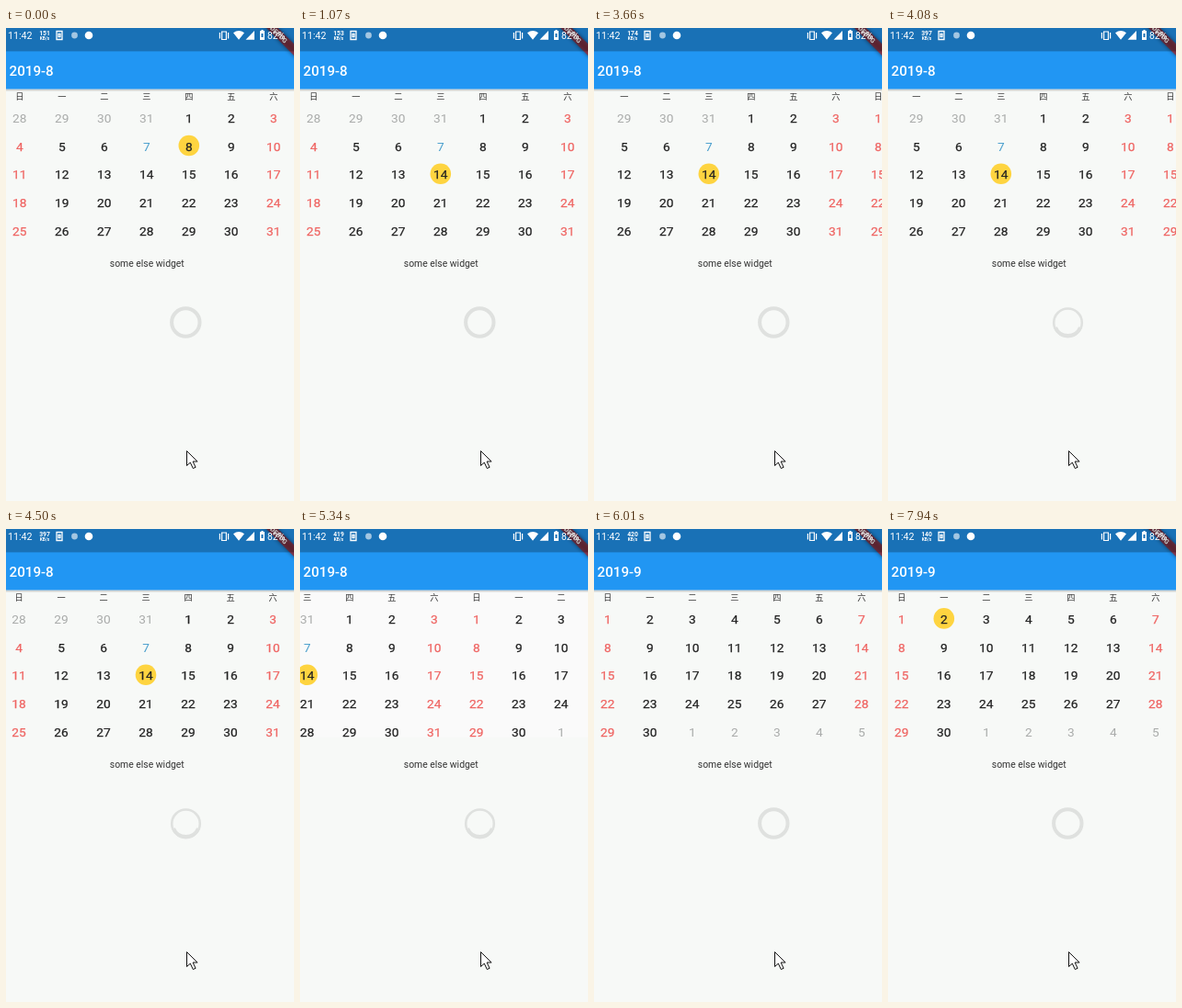
These frames come from a looping animation (313x515 px, 8000 ms). An HTML page:

```html
<!DOCTYPE html>
<html lang="zh">
<head>
<meta charset="utf-8">
<title>Calendar</title>
<style>
  html, body { margin: 0; width: 100%; height: 100%; overflow: hidden; background: #f7f9f7; }
  svg { display: block; width: 100%; height: 100%; }
  text { font-family: Roboto, sans-serif; }
  .mid { text-anchor: middle; }
  .week { font: 9.2px "Noto Sans CJK SC", "Noto Sans CJK", "Noto Sans CJK JP", sans-serif; fill: #333; }
  .day { font-size: 13.7px; fill: #222; stroke: #222; stroke-width: .25px; }
  .weekend { fill: #ef6462; stroke: #ef6462; }
  .today { fill: #4a9fcd; stroke: none; }
  .outside { fill: #a9abaa; stroke: none; }
</style>
</head>
<body>
<svg viewBox="0 0 313 515">
  <defs>
    <linearGradient id="shade" x2="0" y2="1">
      <stop stop-color="#000" stop-opacity=".22"/>
      <stop offset="1" stop-color="#000" stop-opacity="0"/>
    </linearGradient>
    <filter id="blur" x="-50%" y="-200%" width="200%" height="500%">
      <feGaussianBlur stdDeviation="2"/>
    </filter>
  </defs>
  <rect width="313" height="515" fill="#f7f9f7"/>
  <rect id="sheet" y="67" width="313" height="160" fill="#fafafa"/>
  <g id="pages"></g>

  <rect y="66.5" width="313" height="3" fill="url(#shade)"/>
  <rect width="313" height="66.5" fill="#2196f3"/>
  <text id="title" x="3.6" y="51.7" font-size="15.2" font-weight="500" fill="#fff"></text>

  <g transform="translate(296.4 7) rotate(45)">
    <rect x="-32" y="-4.5" width="64" height="9" fill-opacity=".5" filter="url(#blur)"/>
    <rect x="-32" y="-4.5" width="64" height="9" fill="#b71c1c" fill-opacity=".63"/>
    <text class="mid" y="2.5" font-size="7.2" font-weight="900" fill="#fff">DEBUG</text>
  </g>
  <rect width="313" height="25.4" fill-opacity=".25"/>

  <g fill="#fff">
    <text x="2" y="12" font-size="10.7">11:42</text>
    <text id="speed" class="mid" x="42" y="8" font-size="6.8" font-weight="700"></text>
    <text class="mid" x="42" y="13" font-size="4.8" font-weight="700">KB/s</text>
    <path d="M55 3.5h6v9h-6zM57 6.5h2v3h-2z" fill="none" stroke="#fff" stroke-width="1.3"/>
    <circle cx="74.5" cy="8" r="3.4" opacity=".6"/>
    <circle cx="90" cy="8" r="4.3"/>
    <path d="M234.6 4h4.8v8.5h-4.8zM232.4 5v6.5M241.6 5v6.5" fill="none" stroke="#fff" stroke-width="1.2"/>
    <path d="M247 5.2q6-4.4 12 0l-6 7.6zM270 3v9.8h-9.5zM276 3h1.5v-1h2v1h1.5v10h-5v-10z"/>
    <path d="M277.5 6h2v4h-2z" fill="#1b71b6"/>
    <text x="284" y="12" font-size="10.4">82%</text>
  </g>

  <text class="mid" x="153.3" y="260" font-size="10.4" fill="#333">some else widget</text>
  <g fill="none" stroke="#dfe1df">
    <circle id="ring" cx="195.3" cy="320.5" r="15.2" stroke-width="4"/>
    <g id="pressedRing">
      <circle cx="195.5" cy="320.8" r="15.3" stroke-width="2.6"/>
      <path d="M182 326a14.6 14.6 0 0 0 27 0" stroke-width="4"/>
    </g>
  </g>
  <path d="M196.5 460.5v16l3.8-3.4 3 6.4 2.8-1.2-3-6.3h5z" fill="#fff" stroke="#111"/>
</svg>
<script>
const LOOP = 8000, CELL = 46, ROW = 30.65, LEFT = 14.8, TOP = 98.2;
const PAGE = 7 * CELL;
const TODAY = '2019-8-7';

// Each list holds [start in ms, value]; values change abruptly.
const selection = [[0, '2019-8-8'], [950, '2019-8-14'], [6900, '2019-9-1'], [7660, '2019-9-2']];
const speeds = [[0, 151], [950, 153], [2030, 173], [3020, 174], [3960, 397], [4920, 419],
  [5890, 420], [6900, 142], [7940, 140]];
const scroll = [[0, 0], [3420, 6], [3540, 18], [3660, 28], [3810, 31], [3960, 30.5], [4080, 30],
  [4230, 14], [4350, 4], [4500, 0.8], [4620, 0], [5190, 40], [5340, 145], [5460, 235],
  [5610, 298], [5740, 315], [5890, 321], [6010, PAGE]];

const byId = id => document.getElementById(id);
const valueAt = (steps, t) => steps.findLast(([start]) => t >= start)[1];
const dayKey = d => `${d.getFullYear()}-${d.getMonth() + 1}-${d.getDate()}`;

function add(parent, tag, attrs, content = '') {
  const node = document.createElementNS('http://www.w3.org/2000/svg', tag);
  for (const name in attrs) node.setAttribute(name, attrs[name]);
  node.textContent = content;
  return parent.appendChild(node);
}

const marks = {};

function buildPage(month, shift) {
  const page = add(byId('pages'), 'g', { transform: `translate(${shift} 0)` });
  [...'日一二三四五六'].forEach((name, col) =>
    add(page, 'text', { class: 'mid week', x: LEFT + col * CELL, y: 78 }, name));
  const lead = new Date(2019, month, 1).getDay();
  for (let i = 0; i < 35; i++) {
    const date = new Date(2019, month, 1 + i - lead);
    const col = i % 7, x = LEFT + col * CELL, y = TOP + Math.floor(i / 7) * ROW;
    const inside = date.getMonth() === month, key = dayKey(date);
    const kind = !inside ? 'outside' : key === TODAY ? 'today' : col % 6 === 0 ? 'weekend' : '';
    if (inside) marks[key] = add(page, 'circle', { cx: x, cy: y - 0.8, r: 11.3, fill: '#fed440' });
    add(page, 'text', { class: `mid day ${kind}`, x, y: y + 4.8 }, date.getDate());
  }
}

buildPage(7, 0);
buildPage(8, PAGE);

const show = (node, visible) => node.setAttribute('visibility', visible ? 'visible' : 'hidden');

function draw(now) {
  const t = now % LOOP;
  const offset = valueAt(scroll, t), selected = valueAt(selection, t);
  byId('pages').setAttribute('transform', `translate(${-offset} 0)`);
  byId('title').textContent = offset > PAGE / 2 ? '2019-9' : '2019-8';
  byId('speed').textContent = valueAt(speeds, t);
  for (const key in marks) show(marks[key], key === selected);
  const pressed = t >= 4080 && t < 5740;
  show(byId('ring'), !pressed);
  show(byId('pressedRing'), pressed);
  show(byId('sheet'), t >= 5190 && t < 5740);
}

const start = performance.now();
function tick() {
  draw(performance.now() - start);
  requestAnimationFrame(tick);
}
tick();
</script>
</body>
</html>
```
